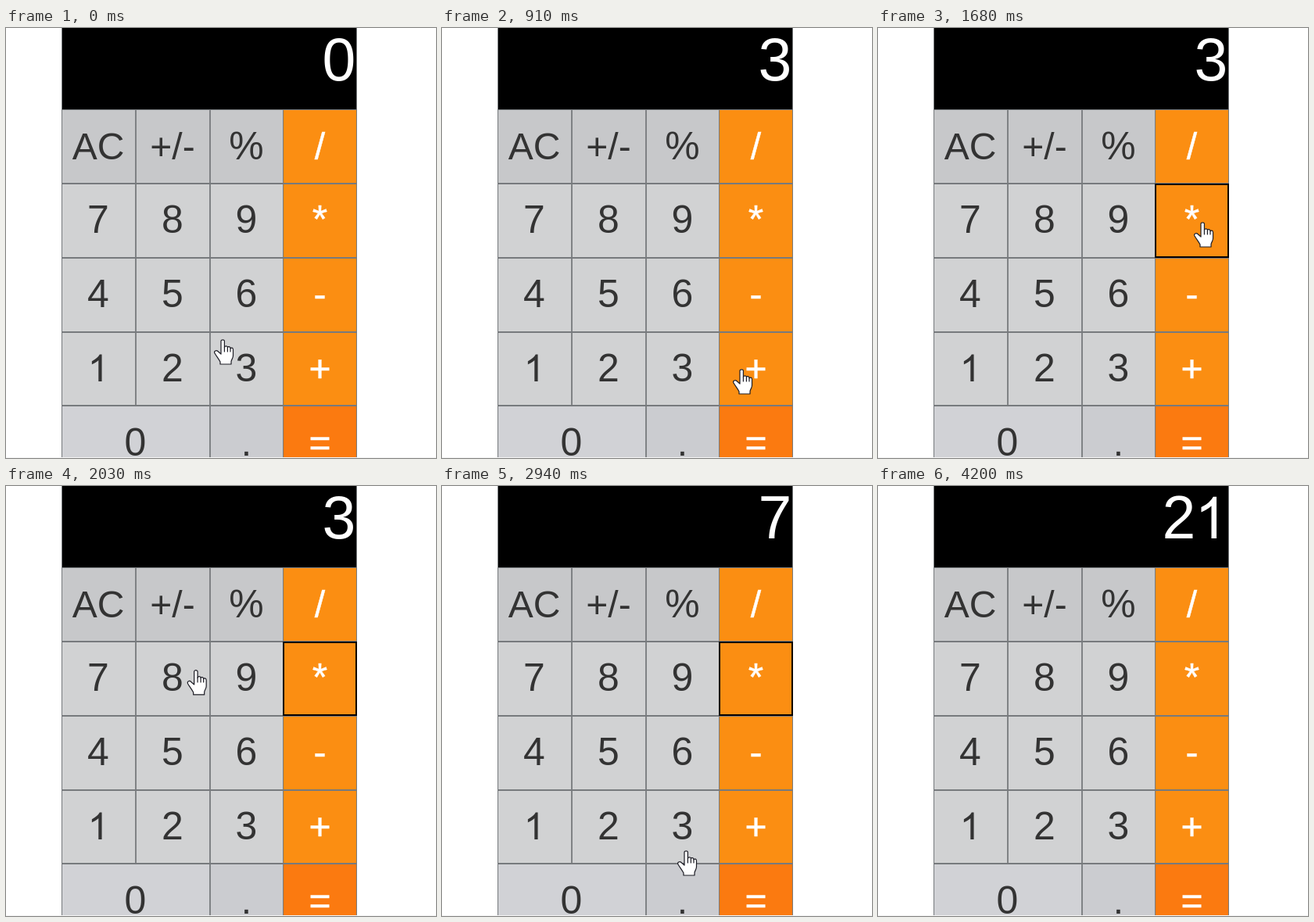
An HTML page for the animation above (4.9 s loop, 550 px wide and 550 px high).

```html
<!DOCTYPE html>
<html lang="en">
<head>
<meta charset="utf-8">
<title>Calculator</title>
<style>
  html, body { margin: 0; width: 100%; height: 100%; overflow: hidden; background: #fff; }
  svg { display: block; width: 550px; height: 550px; font-family: "Liberation Sans", Arial, sans-serif; text-anchor: middle; }
  #lines { fill: none; stroke: #777a7d; stroke-width: 1.8; }
  #lines .thin { stroke-width: 1; }
  #focus { fill: none; stroke: #000; stroke-width: 2; }
  #ring { fill: none; stroke: #ff0; stroke-width: 3; }
  #hand { fill: #fff; stroke: #1c1c24; stroke-width: 1.2; stroke-linejoin: round; stroke-linecap: round; }
  .key { fill: #333; }
  .op { fill: #fff; stroke: #fff; stroke-width: .5; }
</style>
</head>
<body>
<svg viewBox="0 0 550 550">
  <rect x="71" width="378" height="104" fill="#000"/>
  <g id="display" fill="#fff"></g>
  <g id="keys"></g>
  <g id="lines">
    <path d="M166 104V483M261 104V550M71 199H449M71 294H449M71 389H449M71 483H449"/>
    <path class="thin" d="M71.5 0V550M354.5 104V550M448.5 0V550M71 104.5H449"/>
  </g>
  <rect id="focus" x="355" y="200" width="93" height="93"/>
  <circle id="ring" r="19"/>
  <g id="hand">
    <path d="M-2 2.5C-2 .2 2.4 .2 2.4 2.5V10.5C3 8 6.4 8.4 6.4 10.6C7 9 10 9.4 10 11.8C11 10.4 13.5 11 13.5 13.4V21C13.5 25 11 26 11 29V32H-3V29C-4.5 26-8 21.5-10 18C-11.5 15.2-8 13.4-6 15.5L-2 19Z"/>
    <path d="M2.4 10.5V16M6.4 11V16M10 12V16" fill="none"/>
  </g>
  <rect y="549" width="550" height="1" fill="#f3f3f3"/>
</svg>
<script>
  const LOOP = 4900, TICK = 70;
  const el = id => document.getElementById(id);

  // A plain "1" without a foot, which the font lacks.
  const one = (x, y, size) =>
    `<path aria-label="1" transform="translate(${x} ${y}) scale(${size / 2048} ${-size / 2048})" ` +
    `d="M194 0H13V1147Q-52 1085-157 1023T-347 930V1104Q-196 1175-83 1276T77 1472H194Z"/>`;

  // Digits and tall signs are drawn slightly larger than letters.
  function glyph(s, x, y, size) {
    if (s === "1") return one(x, y, size);
    const scale = /^[\d*%]$/.test(s) ? 1.04 : 1;
    return `<text x="${x}" y="${y}" font-size="${size * scale}">${s}</text>`;
  }

  function drawKeys() {
    const rows = ["AC +/- % /", "7 8 9 *", "4 5 6 -", "1 2 3 +", "0 0 . ="];
    const edges = [71, 166, 261, 355, 449];
    let out = "";
    rows.forEach((row, r) => {
      const labels = row.split(" "), last = r === 4, top = 104 + r * 94.75;
      labels.forEach((label, c) => {
        if (label === labels[c - 1]) return;
        const op = c === 3;
        const a = edges[c], b = edges[labels.lastIndexOf(label) + 1];
        const back = op ? (last ? "#fb7a10" : "#fb8e12")
          : r === 0 ? "#c7c8ca" : last ? (c ? "#cbccd0" : "#d1d2d6") : "#d1d2d3";
        out += `<rect x="${a}" y="${top}" width="${b - a}" height="95" fill="${back}"/>` +
          `<g class="${op ? "op" : "key"}">${glyph(label, (a + b) / 2 - .5, Math.round(top + 63.5), 48)}</g>`;
      });
    });
    el("keys").innerHTML = out;
  }

  let shown = "";
  function show(value) {
    if (value === shown) return;
    shown = value;
    el("display").innerHTML = [...value]
      .map((d, i) => glyph(d, 426 - (value.length - 1 - i) * 41, 67, 74)).join("");
  }

  // Pointer legs: start and end time, then where the tip arrives.
  const home = [277, 398];
  const legs = [
    [0, 140, 290, 416],
    [770, 910, 383, 436], [910, 1260, 423, 305], [1260, 1470, 415, 248],
    [1680, 2310, 138, 227],
    [2520, 2940, 312, 466], [2940, 3150, 391, 524],
    [3290, 3570, 398, 520],
    [3990, 4130, 417, 540]
  ];
  const ease = k => 1 - (1 - k) ** 1.2;
  function tip(t) {
    let [x, y] = home;
    for (const [start, end, toX, toY] of legs) {
      const k = ease(Math.min(1, Math.max(0, (t - start) / (end - start))));
      x += (toX - x) * k;
      y += (toY - y) * k;
    }
    return [x, y];
  }

  const clicks = [700, 1540, 2450, 3570];
  const visible = (id, on) => el(id).setAttribute("visibility", on ? "visible" : "hidden");
  const place = (id, x, y) => el(id).setAttribute("transform", `translate(${x} ${y})`);

  function draw(now) {
    const t = Math.floor((now % LOOP) / TICK) * TICK;
    const [x, y] = tip(t);
    show(t < 770 ? "0" : t < 2520 ? "3" : t < 3640 ? "7" : "21");
    visible("focus", t >= 1610 && t < 3710);
    visible("hand", t < 4200);
    visible("ring", clicks.includes(t));
    place("hand", x, y);
    place("ring", x - 15, y - 5);
  }
  function loop(now) {
    draw(now);
    requestAnimationFrame(loop);
  }

  drawKeys();
  draw(0);
  requestAnimationFrame(loop);
</script>
</body>
</html>
```
